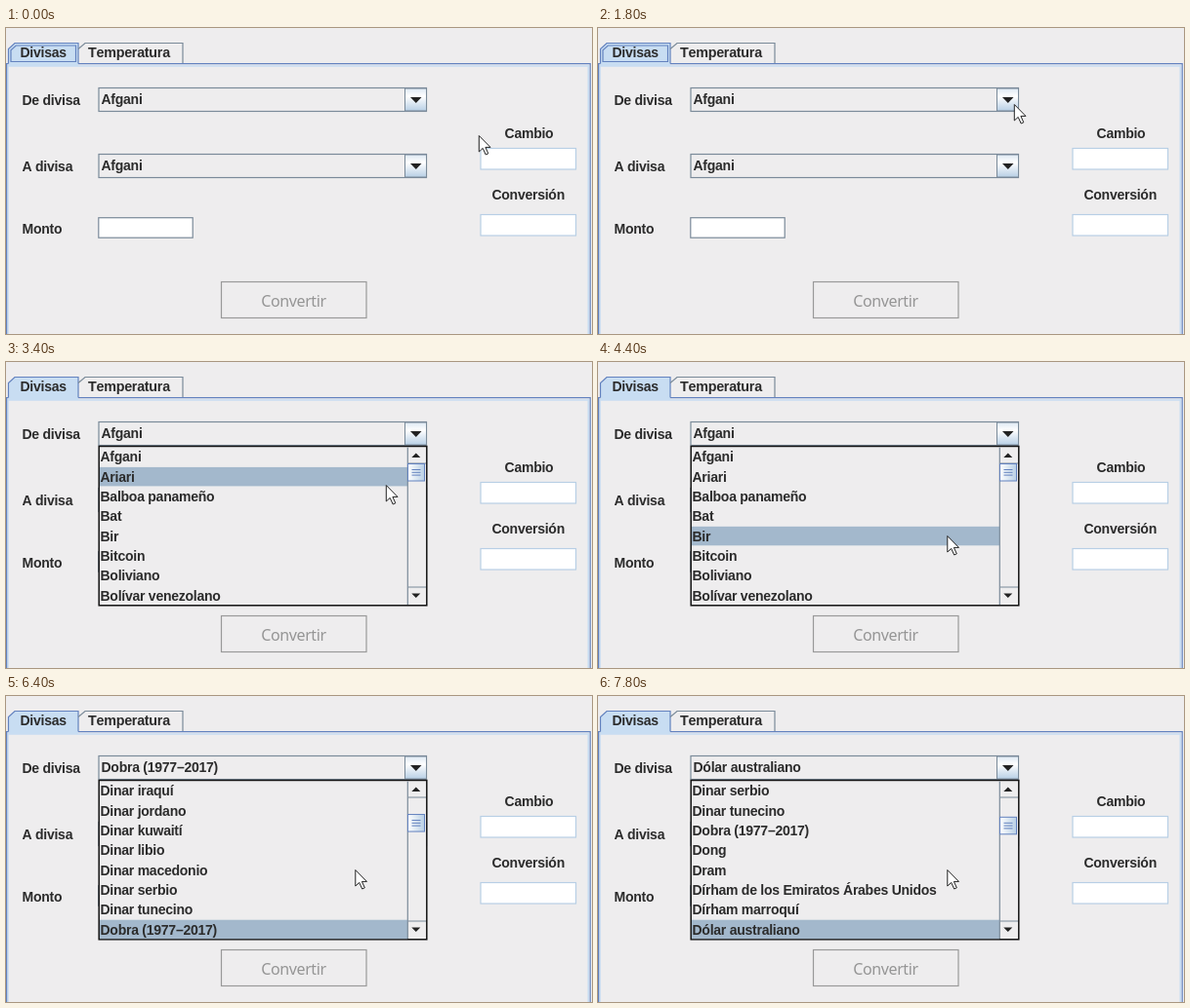
These frames come from a looping animation (600 px wide and 314 px high, 8000 ms). An HTML page:

```html
<!DOCTYPE html>
<html lang="es">
<head>
<meta charset="utf-8">
<title>Conversor</title>
<style>
html, body { margin: 0; width: 100%; height: 100%; overflow: hidden; background: #eeedee; }
svg { display: block; width: 600px; height: 314px; }
text { font: bold 14px "Liberation Sans", Arial, sans-serif; letter-spacing: -.25px; font-kerning: none; fill: #2b2b2b; }
.edge { fill: none; stroke: #7a8a99; stroke-width: 1.2; }
.blue { fill: none; stroke: #6382bf; stroke-width: 1.2; }
.off { fill: #fff; stroke: #b8cfe5; stroke-width: 1.2; }
</style>
</head>
<body>
<svg viewBox="0 0 600 314">
  <defs>
    <linearGradient id="shine" x2="0" y2="1">
      <stop offset="0" stop-color="#dde8f3"/>
      <stop offset=".35" stop-color="#fff"/>
      <stop offset="1" stop-color="#b8cfe5"/>
    </linearGradient>
    <linearGradient id="thumbShine">
      <stop offset="0" stop-color="#fff"/>
      <stop offset="1" stop-color="#b8cfe5"/>
    </linearGradient>
    <g id="combo">
      <rect class="edge" x="95" y="61.5" width="335.5" height="24"/>
      <rect x="408.5" y="62" width="22" height="23" fill="url(#shine)" stroke="#7a8a99"/>
      <path d="M414 71h11.5l-5.7 6z" fill="#222"/>
    </g>
  </defs>
  <rect width="600" height="314" fill="#eeedee"/>

  <path d="M2 39H597M2 38V314M596.3 38V314" fill="none" stroke="#c8ddf2" stroke-width="1.6"/>
  <path class="blue" d="M.6 314V36.6H598.2V314"/>
  <path d="M2.5 39V21.5L9 15.5H74V39z" fill="#c8ddf2"/>
  <path class="blue" d="M2.5 36.6V21.5L9 15.5H74V36.6"/>
  <path class="edge" d="M74 21.5L81 15.5H181V36"/>
  <path class="blue" id="tabFocus" d="M5 34.5V22.7L10.2 18H71.5V34.5z"/>
  <text x="14.5" y="30">Divisas</text>
  <text x="84" y="30" style="font-size:14.3px">Temperatura</text>

  <text x="16.5" y="78.5">De divisa</text>
  <text x="16.5" y="146.5">A divisa</text>
  <text x="16.5" y="211">Monto</text>
  <text x="535.5" y="112.5" text-anchor="middle">Cambio</text>
  <text x="534.7" y="176" text-anchor="middle">Conversión</text>
  <rect class="off" x="486" y="123.5" width="97.5" height="21.5"/>
  <rect class="off" x="486" y="191.5" width="97.5" height="21.5"/>
  <rect class="edge" x="94.8" y="194.7" width="96.4" height="20.5" style="fill:#fff"/>
  <use href="#combo"/>
  <use href="#combo" y="68"/>
  <text id="chosen" x="97.5" y="77.7"></text>
  <text x="97.5" y="145.7">Afgani</text>
  <rect x="220.5" y="260.5" width="148.5" height="37" fill="none" stroke="#999" stroke-width="1.2"/>
  <text x="294.5" y="285.7" text-anchor="middle" style="font:16px 'Noto Sans',sans-serif;letter-spacing:-.4px;fill:#959595">Convertir</text>

  <g id="popup">
    <rect x="95.2" y="86.5" width="335.6" height="163.3" fill="#eeedee" stroke="#111" stroke-width="1.5"/>
    <rect id="highlight" x="96" width="315" height="19.5" fill="#a3b8cc"/>
    <g id="rows"></g>
    <path class="edge" d="M411.3 87.4V249M412 104H430M412 231H430"/>
    <path d="M415.3 98h9l-4.5-4.5zM415.3 237.5h9l-4.5 4.5z" fill="#222"/>
    <g id="thumb">
      <rect x="411.5" y="104.5" width="17" height="17.5" fill="url(#thumbShine)" stroke="#6382bf"/>
      <path d="M415.5 110.5h9M415.5 113.3h9M415.5 116.1h9" stroke="#6382bf"/>
    </g>
  </g>

  <path id="cursor" d="M.3.5V17L4.2 13.4L7.2 20L9.8 18.8L6.9 12.4H12z" fill="#fff" stroke="#222"/>
</svg>
<script>
const LOOP = 8000, STEP = 200, ROWS = 8, ROW_H = 20.3, LIST_TOP = 87.6;
const OPEN_AT = 2200;
const $ = id => document.getElementById(id);
const SVG_NS = "http://www.w3.org/2000/svg";

const head = ["Afgani", "Ariari", "Balboa panameño", "Bat", "Bir", "Bitcoin",
  "Boliviano", "Bolívar venezolano"];
const TAIL_START = 21;
const tail = ["Colón costarricense",
  ...["checa", "danesa", "islandesa", "noruega", "sueca"].map(s => "Corona " + s),
  "Córdoba", "Dalasi",
  ...["argelino", "bahreiní", "iraquí", "jordano", "kuwaití", "libio", "macedonio",
    "serbio", "tunecino"].map(s => "Dinar " + s),
  "Dobra (1977–2017)", "Dong", "Dram", "Dírham de los Emiratos Árabes Unidos",
  "Dírham marroquí", "Dólar australiano"];
const currency = i => i < ROWS ? head[i] : tail[i - TAIL_START];

// [time, x, y] of the pointer tip
const path = [[0, 484, 110], [400, 484, 110], [1400, 426, 78], [2400, 426, 78],
  [3400, 389, 126], [4200, 357.5, 178], [LOOP, 357.5, 178]];
// [time, index] chosen with the keyboard
const keys = [[5000, 28], [5200, 38], [7000, 39], [7400, 40], [7600, 42], [7800, 43]];

const rows = Array.from({ length: ROWS }, (_, i) => {
  const row = document.createElementNS(SVG_NS, "text");
  row.setAttribute("x", 96.5);
  row.setAttribute("y", 102.4 + i * ROW_H);
  return $("rows").appendChild(row);
});

function pointer(t) {
  const i = path.findIndex(p => p[0] > t);
  const [t0, x0, y0] = path[i - 1], [t1, x1, y1] = path[i];
  const k = (t - t0) / (t1 - t0);
  return [x0 + (x1 - x0) * k, y0 + (y1 - y0) * k];
}

function draw(t) {
  const [x, y] = pointer(t);
  const open = t >= OPEN_AT;
  const key = keys.findLast(k => k[0] <= t);
  const selected = key ? key[1] : 0;
  const first = key ? selected - ROWS + 1 : 0;
  const hovered = x < 411 ? Math.floor((y - LIST_TOP) / ROW_H) : 0;
  const lit = key ? ROWS - 1 : Math.max(0, hovered);

  $("cursor").setAttribute("transform", `translate(${x} ${y})`);
  $("tabFocus").style.display = open ? "none" : "";
  $("popup").style.display = open ? "" : "none";
  $("chosen").textContent = currency(selected);
  $("highlight").setAttribute("y", LIST_TOP + lit * ROW_H);
  $("thumb").setAttribute("transform", `translate(0 ${first * .55})`);
  rows.forEach((row, i) => row.textContent = currency(first + i));
}

const start = performance.now();
function tick() {
  const t = (performance.now() - start) % LOOP;
  draw(Math.floor(t / STEP) * STEP);
  requestAnimationFrame(tick);
}
tick();
</script>
</body>
</html>
```
